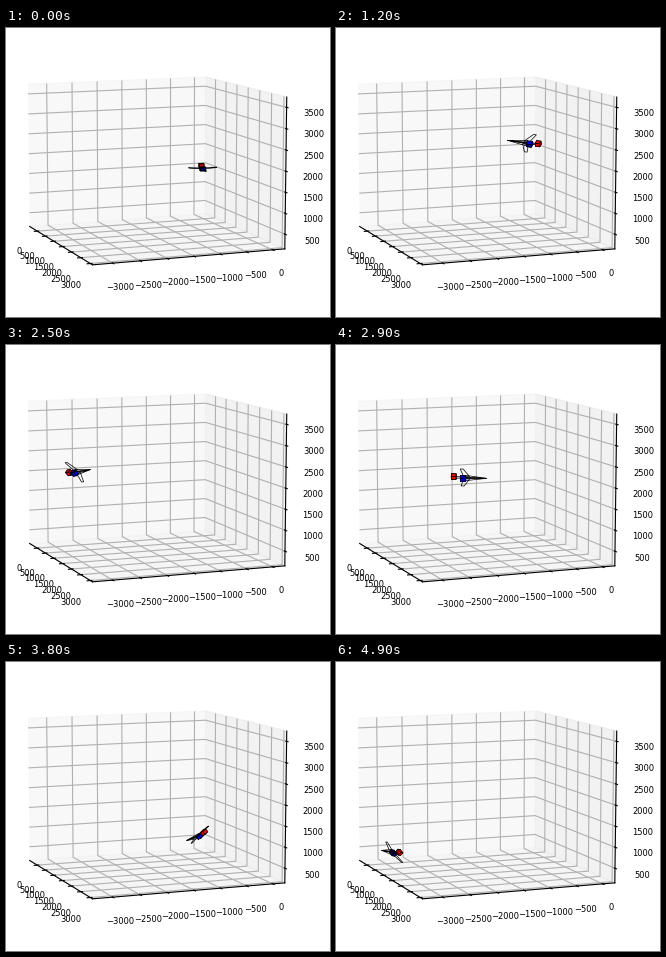
Recreate the animation shown at these times as a matplotlib script. Size 324 by 289 pixels, loop 5 s.

```python
import numpy as np
import matplotlib.pyplot as plt
from matplotlib.animation import FuncAnimation
from matplotlib.collections import PolyCollection

W, H, DPI = 324, 289, 100
FRAMES, INTERVAL = 50, 100
ELEV, AZIM = 9, -21.3
SIDE, CENTER = 308, (147, 136.4)

# time (100 ms), screen x, screen y, yaw, roll, pitch
KEYS = np.array([
    (0, 197, 140, -82, 0, 0),
    (3, 210, 139, 10, 25, 8),
    (7, 218, 127, 100, 13, 16),
    (10, 206, 116, 140, 30, 12),
    (12, 192, 115, 160, 30, 4),
    (17, 109, 125, 188, 20, 2),
    (19, 81, 127, 210, 30, 4),
    (21.5, 60, 127, 265, 45, 8),
    (25, 70, 127, 312, 50, 13),
    (30, 144, 135, 368, 45, -6),
    (34, 197, 149, 425, 41, -25),
    (36, 203, 160, 455, 40, -28),
    (39, 183, 179, 500, 28, -16),
    (42, 141, 187, 540, 16, -2),
    (45, 97, 190, 565, 25, 2),
    (49, 57, 190, 598, 42, 12),
])


def pose(t):
    """Smooth interpolation through the key poses."""
    times, values = KEYS[:, 0], KEYS[:, 1:]
    slopes = np.gradient(values, times, axis=0)
    i = int(np.clip(np.searchsorted(times, t, side="right") - 1, 0, len(times) - 2))
    span = times[i + 1] - times[i]
    s = (t - times[i]) / span
    return ((1 + 2 * s) * (1 - s) ** 2 * values[i] + s * (1 - s) ** 2 * span * slopes[i]
            + s * s * (3 - 2 * s) * values[i + 1] + s * s * (s - 1) * span * slopes[i + 1])


def box(center, half):
    corners = np.array([(a, b, c) for a in (-1, 1) for b in (-1, 1) for c in (-1, 1)])
    corners = corners * half + center
    sides = ((0, 1, 3, 2), (4, 5, 7, 6), (0, 1, 5, 4), (2, 3, 7, 6), (0, 2, 6, 4), (1, 3, 7, 5))
    return [corners[list(side)] for side in sides]


# Aircraft in pixels: forward, left, up
NOSE = (22, 0, 0)
CLEAR = (1, 1, 1, 0)
PARTS = [(f, "red") for f in box((-11, 0, 0.8), (2.3, 2.3, 1.8))]
PARTS += [(f, "blue") for f in box((-1.5, 0, -1.2), (2.6, 2.6, 1.6))]
for sign in (-1, 1):
    PARTS.append((np.array([(5, 2 * sign, 0), (-1, 14 * sign, 0),
                            (-4, 14 * sign, 0), (-1, 2 * sign, 0)]), CLEAR))
    PARTS.append((np.array([NOSE, (1, 2.4 * sign, -2), (1, 2.4 * sign, 1)]), CLEAR))
PARTS.append((np.array([NOSE, (-9, 0, 1), (-9, 0, -1)]), CLEAR))


def place(points, x, y, yaw, roll, pitch):
    """Screen points and depth of one face."""
    yaw, roll, pitch, elev = np.radians((yaw, roll, pitch, ELEV))
    fwd, left, up = np.asarray(points, float).T
    left, up = (left * np.cos(roll) + up * np.sin(roll),
                up * np.cos(roll) - left * np.sin(roll))
    fwd, up = (fwd * np.cos(pitch) - up * np.sin(pitch),
               fwd * np.sin(pitch) + up * np.cos(pitch))
    right = fwd * np.cos(yaw) - left * np.sin(yaw)
    away = fwd * np.sin(yaw) + left * np.cos(yaw)
    rise = up * np.cos(elev) + away * np.sin(elev)
    depth = away * np.cos(elev) - up * np.sin(elev)
    return np.column_stack((x + right, y - rise)), depth.mean()


fig = plt.figure(figsize=(W / DPI, H / DPI), dpi=DPI, facecolor="white")

left = CENTER[0] - SIDE * 0.095 / 0.185
bottom = H - CENTER[1] - SIDE * 0.095 / 0.185
ax = fig.add_axes([left / W, bottom / H, SIDE / W, SIDE / H], projection="3d")
ax.view_init(elev=ELEV, azim=AZIM)
ax.set(xlim=(-480, 3110), ylim=(-3365, 235), zlim=(150, 3740))
for axis in (ax.xaxis, ax.yaxis, ax.zaxis):
    axis.set_major_locator(plt.MultipleLocator(500))
ax.tick_params(labelsize=6)

sky = fig.add_axes([0, 0, 1, 1])
sky.set(xlim=(0, W), ylim=(H, 0))
sky.axis("off")
plane = PolyCollection([], edgecolors="black", linewidths=0.5)
sky.add_collection(plane)


def draw(frame):
    state = pose(frame)
    faces = [(*place(points, *state), color) for points, color in PARTS]
    faces.sort(key=lambda face: -face[1])
    plane.set_verts([face[0] for face in faces])
    plane.set_facecolor([face[2] for face in faces])
    return [plane]


anim = FuncAnimation(fig, draw, frames=FRAMES, interval=INTERVAL, repeat=True, repeat_delay=0)
plt.show()
```
